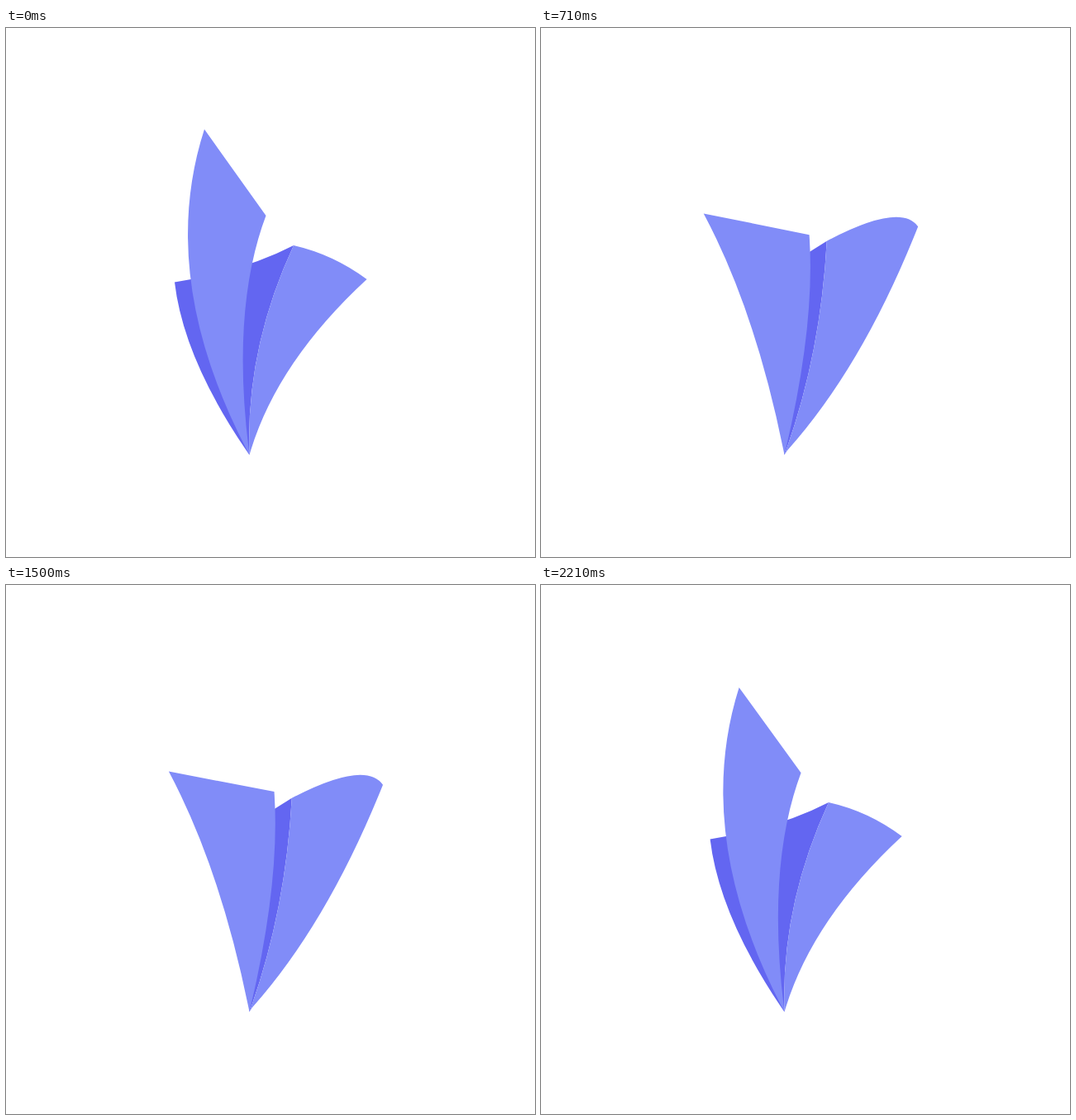
Recreate the animation shown at these times as an HTML page. Size 640 by 640 pixels, loop 2.28 s.

```html
<!DOCTYPE html>
<html>
<head>
<meta charset="utf-8">
<style>
html, body { margin: 0; width: 100%; height: 100%; overflow: hidden; background: #fff; }
svg { display: block; width: 100vw; height: 100vh; }
</style>
</head>
<body>
<svg viewBox="0 0 640 640">
  <path id="back" fill="#6366f1"/>
  <path id="right" fill="#818cf8"/>
  <path id="left" fill="#818cf8"/>
</svg>
<script>
const LOOP = 2280, STEP = LOOP / 32;   // stepped playback
const CYCLE = 2204, FOLD = 500, SPREAD = 560;
const ROOT = [294.5, 516.5];

// Pose 0 is upright, 1 half folded, 2 spread: steady to 1, then easing out to 2.
function poseAt(time) {
  const t = Math.min(time, Math.abs(CYCLE - time));
  if (t < FOLD) return t / FOLD;
  const x = Math.min(1, (t - FOLD) / SPREAD);
  return 1 + Math.sin(Math.PI / 2 * x ** 1.15);
}

const mix = (a, b, k) => a + (b - a) * k;
const mixPoint = (a, b, k) => a.map((n, i) => mix(n, b[i], k));

// Control point of a bowed edge; bend is sideways, reach lies along the chord.
function bow(from, bend, reach, to = ROOT) {
  const [x, y] = mixPoint(from, to, reach);
  return [x + (to[1] - from[1]) * bend, y - (to[0] - from[0]) * bend];
}

function draw(pose) {
  const half = pose < 1 ? 0 : 1;
  const bend = (...b) => mix(b[half], b[half + 1], pose - half);
  const point = (...p) => mixPoint(p[half], p[half + 1], pose - half);
  const slide = (a, b) => mixPoint(a, b, pose / 2);

  const leftTip = point([240, 122.5], [203, 274], [190.3, 173.5]);
  const rightTip = point([436.5, 304], [449.5, 306], [463, 172.5]);
  const backTip = point([204, 307.5], [267, 309], [240, 324]);
  const corner = slide([314.5, 227], [328, 258]);
  const crease = slide([348, 263], [345, 256]);
  const heel = slide(ROOT, [298.5, 510]);

  const curl = bend(-0.12, 0.045, 0.105);
  const creaseBow = bow(crease, curl, 0.52);
  const rim = [396 + 26 * pose, 274 - 26 * pose - 11 * pose ** 2];
  const outerBow = bow(rightTip, bend(-0.137, 0.013, 0.165), 0.57, heel);
  const leftBow = bow(leftTip, bend(-0.208, 0.052, 0.094), 0.43);

  const shapes = {
    back: `M${backTip}Q288,294 ${crease}Q${creaseBow} ${ROOT}Q${bow(backTip, curl, 0.4)} ${backTip}Z`,
    right: `M${crease}Q${rim} ${rightTip}Q${outerBow} ${heel}L${ROOT}Q${creaseBow} ${crease}Z`,
    left: `M${leftTip}L${corner}Q${bow(corner, curl, 0.4)} ${ROOT}Q${leftBow} ${leftTip}Z`
  };
  for (const id in shapes) document.getElementById(id).setAttribute("d", shapes[id]);
}

function frame() {
  const step = Math.floor(((performance.now() + 6) % LOOP) / STEP);
  draw(poseAt(step * STEP));
  requestAnimationFrame(frame);
}
frame();
</script>
</body>
</html>
```
